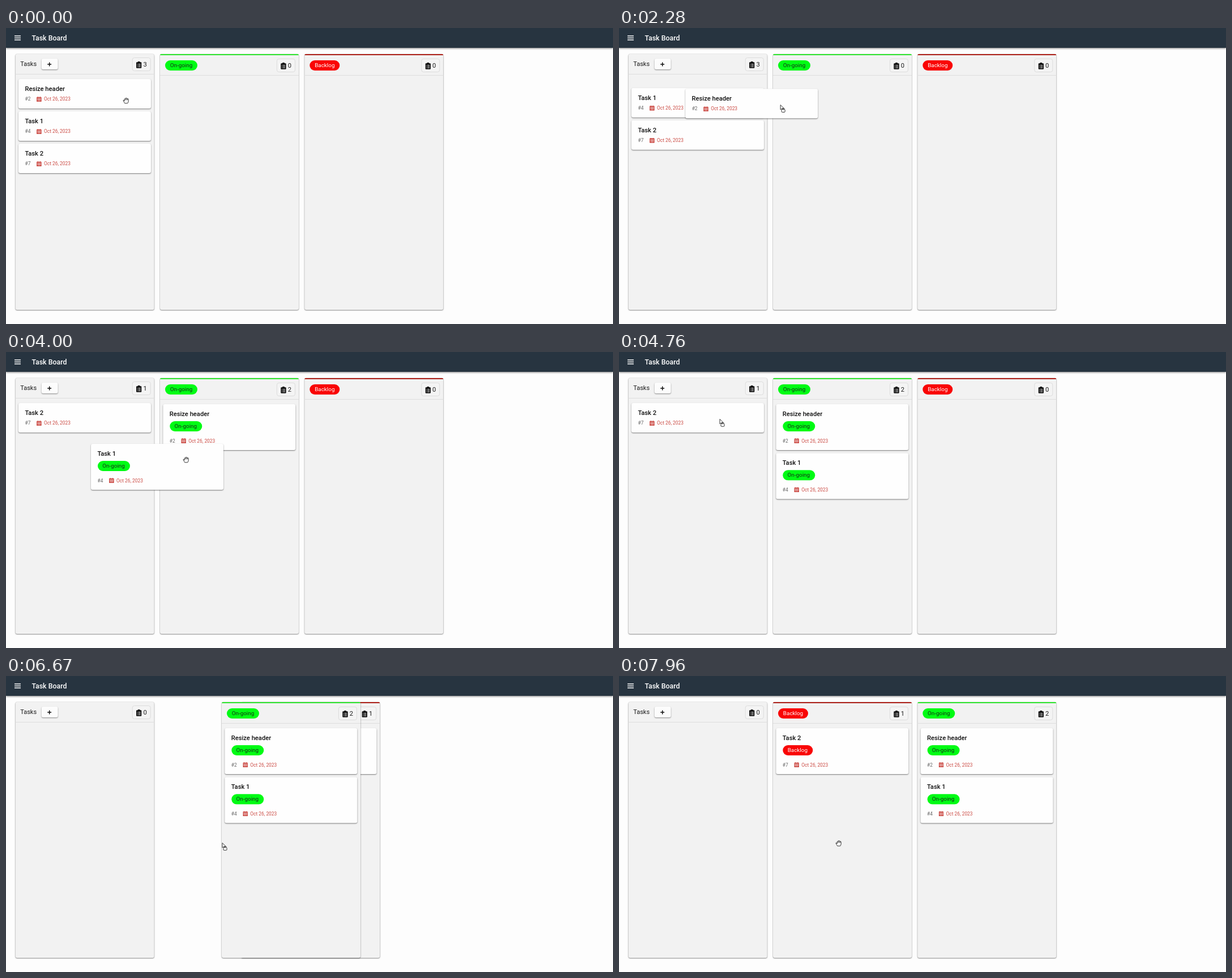
Write an HTML page that moves like this. It is 1072 by 522 pixels and loops after 8000 ms.

```html
<!DOCTYPE html>
<html lang="en">
<head>
<meta charset="utf-8">
<title>Task Board</title>
<style>
  html, body { margin: 0; width: 100%; height: 100%; overflow: hidden; background: #fdfdfd; }
  body { font-family: Roboto, "Liberation Sans", sans-serif; color: #1c1c1c; }
  #stage { position: relative; width: 1072px; height: 522px; overflow: hidden; }
  #stage div, #stage svg { position: absolute; box-sizing: border-box; }
  .text { line-height: 20px; white-space: nowrap; }
  #top { left: 0; top: 0; width: 1072px; height: 35px; background: #273440;
    box-shadow: 0 1px 3px rgba(0,0,0,.5); z-index: 5; }
  #loader { left: 11px; top: 37px; width: 1050px; height: 2px; background: #cdbfc8; }
  .column { left: 0; top: 46px; width: 245px; height: 451px; background: #f2f2f2; border-radius: 3px;
    box-shadow: 0 0 0 .5px rgba(0,0,0,.12), 0 1px 2px rgba(0,0,0,.42); }
  .bar { left: 0; top: 0; width: 245px; height: 2px; border-radius: 3px 3px 0 0; }
  .rule { left: 0; width: 245px; height: 1px; background: #dedede; }
  .badge { left: 206px; width: 33px; height: 24px; border: 1px solid #dcdcdc; border-radius: 4px; background: #f4f4f4; }
  .add { left: 45.5px; top: 8px; width: 29px; height: 19px; background: #fcfcfc; border-radius: 3px;
    box-shadow: 0 1px 2px rgba(0,0,0,.45); }
  .pill { height: 18px; border-radius: 9px; font-size: 9.9px; line-height: 18px; text-align: center; white-space: nowrap; }
  .card { left: 0; top: 0; width: 234px; background: #fefefe; border-radius: 3px;
    box-shadow: 0 1px 2px rgba(0,0,0,.5); }
  #cursor { left: 0; top: 0; width: 1px; height: 1px; z-index: 9; }
  #cursor svg { overflow: visible; }
</style>
</head>
<body>
<div id="stage">
  <div id="top">
    <svg style="left:15px;top:13px" width="11" height="9"><path d="M0 1H11M0 4.5H11M0 8H11" stroke="#fff" stroke-width="1.4"/></svg>
  </div>
  <div id="loader"></div>
  <div id="cursor">
    <svg id="hand" width="1" height="1"><path d="M-2.8 .8V-2.6Q-2.2-4-1.2-3V-4Q-.3-5.2 .7-4.1Q1.7-5 2.5-3.4Q4-3.8 4.2-2V1Q4 3 2.7 4.8H-2.2Q-3.4 3-5-.1Q-4.8-1.5-3.6-.3ZM-1.2-3V-.8M.7-4V-.8M2.5-3.4V-.8" fill="#fff" stroke="#222" stroke-width=".9" stroke-linejoin="round"/></svg>
    <svg id="grip" width="1" height="1"><path d="M-4-3.6V4.8L-1.9 3L-.6 6L.8 5.3L-.5 2.5H2.2Z" fill="#fff" stroke="#222" stroke-width=".9"/><rect x="-2" y="4.3" width="6" height="5" rx="1.2" fill="#fff" stroke="#333"/><path d="M-.5 4V2.8H3V4" fill="none" stroke="#333" stroke-width=".8"/></svg>
  </div>
</div>
<script>
const $ = id => document.getElementById(id);
const LOOP = 8000, SETTLE = 200;
const SLOT_X = [16.7, 272, 527.3], TOP = 46, CARD_X = 5.3;
const LABELS = [
  null,
  { name: 'On-going', width: 57, bg: '#00fb14', ink: '#173017', bar: '#2ee52e' },
  { name: 'Backlog', width: 53, bg: '#f90505', ink: '#fff', bar: '#ad2019' }
];

function box(parent, cls, style = '', html = '') {
  const el = document.createElement('div');
  el.className = cls;
  el.style.cssText = style;
  el.innerHTML = html;
  parent.append(el);
  return el;
}

// y is the middle of the line
function text(parent, x, y, size, str, color = '#1c1c1c', weight = 400) {
  return box(parent, 'text',
    `left:${x}px;top:${y - 10}px;font-size:${size}px;color:${color};font-weight:${weight}`, str);
}

function pill(parent, x, y, label) {
  return box(parent, 'pill',
    `left:${x}px;top:${y}px;width:${label.width}px;background:${label.bg};color:${label.ink}`, label.name);
}

const clipboard = '<svg style="left:5.5px;top:5.5px" width="10" height="12"><rect x=".3" y="1.3" width="9.4" height="10.5" rx="1.2" fill="#111"/><rect x="3" y="0" width="4" height="2.6" rx="1" fill="#111"/><path d="M2 4.8H3M4 4.8H8M2 7H3M4 7H8M2 9.2H3M4 9.2H8" stroke="#eee" stroke-width=".9"/></svg>';
const calendar = '<svg style="left:32px;top:-4.5px" width="9" height="9"><path d="M.5 1.2H8.2V8.6H.5ZM2.3 0V2M6.4 0V2" fill="#c9433d" stroke="#c9433d" stroke-width=".8"/><path d="M.8 3.1H8M.8 5.5H8M3.1 3.2V8.2M5.7 3.2V8.2" stroke="#fff" stroke-width=".6"/></svg>';

text($('top'), 45.5, 17.5, 12.4, 'Task Board', '#fff', 500);

const columns = LABELS.map((label, i) => {
  const el = box($('stage'), 'column');
  const dy = label ? 2 : 0;
  if (label) {
    box(el, 'bar', `background:${label.bar}`);
    pill(el, 9, 10.5, label);
  } else {
    text(el, 8.5, 18.3, 11, 'Tasks');
    box(el, 'add', '', '<svg style="left:10.5px;top:5.5px" width="8" height="8"><path d="M.5 4H7.5M4 .5V7.5" stroke="#111" stroke-width="1.5"/></svg>');
  }
  box(el, 'rule', `top:${35 + dy}px`);
  box(el, 'badge', `top:${6 + dy}px`, clipboard);
  return { el, count: text(el, 225.7, 18.8 + dy, 11.2, '0') };
});

// grab, move, drop: times of each drag; home: column it lands in
const cards = [
  { title: 'Resize header', id: '#2', grab: 1920, drop: 2420, home: 1, endY: 46, slots: [[0, 0]] },
  { title: 'Task 1', id: '#4', grab: 3480, drop: 4000, home: 1, endY: 132.3, slots: [[0, 1], [2150, 1], [2350, 0]] },
  { title: 'Task 2', id: '#7', grab: 4720, drop: 5350, home: 2, endY: 46, slots: [[0, 2], [2150, 2], [2350, 1], [3700, 1], [3900, 0]] }
];
const columnDrag = { grab: 6320, drop: 6760 };

for (const c of cards) {
  c.el = box(columns[0].el, 'card');
  text(c.el, 11.4, 17.8, 11.2, c.title, '#111', 500);
  c.pill = pill(c.el, 11.5, 30, LABELS[c.home]);
  c.meta = box(c.el, '', 'left:0;top:0');
  text(c.meta, 11.5, 0, 8.4, c.id, '#666');
  c.meta.insertAdjacentHTML('beforeend', calendar);
  text(c.meta, 45, 0, 8.4, 'Oct 26, 2023', '#cb4a43');
}

// cursor path: time, x, y
const path = [
  [0, 212, 128], [700, 212, 128], [1600, 197, 145], [1700, 197, 145], [1880, 194, 122], [1960, 194, 122],
  [2400, 310, 143], [3180, 310, 143], [3450, 190, 118], [3540, 190, 118], [3950, 318, 190],
  [4250, 318, 190], [4650, 182, 122], [4800, 182, 122], [5300, 713, 140], [5600, 713, 140],
  [6250, 277, 298], [6400, 277, 298], [6670, 386, 298], [6720, 388, 295]
];

const ease = p => { p = Math.min(1, Math.max(0, p)); return p * p * (3 - 2 * p); };
const mix = (a, b, p) => a + (b - a) * p;

function at(track, t) {
  const i = track.findIndex(k => k[0] > t);
  if (i < 0) return track[track.length - 1].slice(1);
  const a = track[i - 1], b = track[i], p = ease((t - a[0]) / (b[0] - a[0]));
  return a.slice(1).map((v, n) => mix(v, b[n + 1], p));
}

const held = (d, t) => t >= d.grab && t < d.drop;

function dragged(d, t) {
  if (t < d.grab) return [0, 0];
  const a = at(path, d.grab), b = at(path, Math.min(t, d.drop));
  return [b[0] - a[0], b[1] - a[1]];
}

function place(el, x, y) { el.style.transform = `translate(${x}px,${y}px)`; }

function draw(t) {
  const [cx, cy] = at(path, t);
  const holding = [...cards, columnDrag].some(d => held(d, t));
  place($('cursor'), cx, cy);
  $('hand').style.display = holding ? 'none' : '';
  $('grip').style.display = holding ? '' : 'none';
  $('loader').style.display = t >= 5400 && t < 5850 ? '' : 'none';

  const slide = mix(SLOT_X[1] + dragged(columnDrag, t)[0], SLOT_X[2], ease((t - columnDrag.drop) / 220));
  const xs = [
    SLOT_X[0],
    t < columnDrag.grab ? SLOT_X[1] : slide,
    mix(SLOT_X[2], SLOT_X[1], ease((t - 6570) / 220))
  ];
  columns.forEach((c, i) => {
    place(c.el, xs[i], 0);
    c.el.style.zIndex = 1;
  });
  if (cards.some(c => held(c, t))) columns[0].el.style.zIndex = 2;
  if (t >= columnDrag.grab && t < 7000) columns[1].el.style.zIndex = 2;

  const counts = [0, 0, 0];
  for (const c of cards) {
    const done = t >= c.drop, col = done ? c.home : 0;
    counts[col]++;
    const parent = columns[col].el;
    if (c.el.parentNode !== parent) parent.append(c.el);
    const [dx, dy] = dragged(c, t);
    let x = CARD_X + dx, y = 44 + 57 * at(c.slots, t)[0] + dy;
    if (done) {
      const p = ease((t - c.drop) / SETTLE);
      x = mix(x + SLOT_X[0] - SLOT_X[col], CARD_X, p);
      y = mix(y, c.endY, p);
    }
    place(c.el, x, y);
    c.el.style.height = (done ? 81 : 52) + 'px';
    c.el.style.zIndex = held(c, t) ? 3 : 1;
    c.pill.style.display = done ? '' : 'none';
    c.meta.style.top = (done ? 64.5 : 35.3) + 'px';
  }
  columns.forEach((c, i) => { c.count.textContent = counts[i]; });
}

function tick() {
  draw(performance.now() % LOOP);
  requestAnimationFrame(tick);
}
tick();
</script>
</body>
</html>
```
